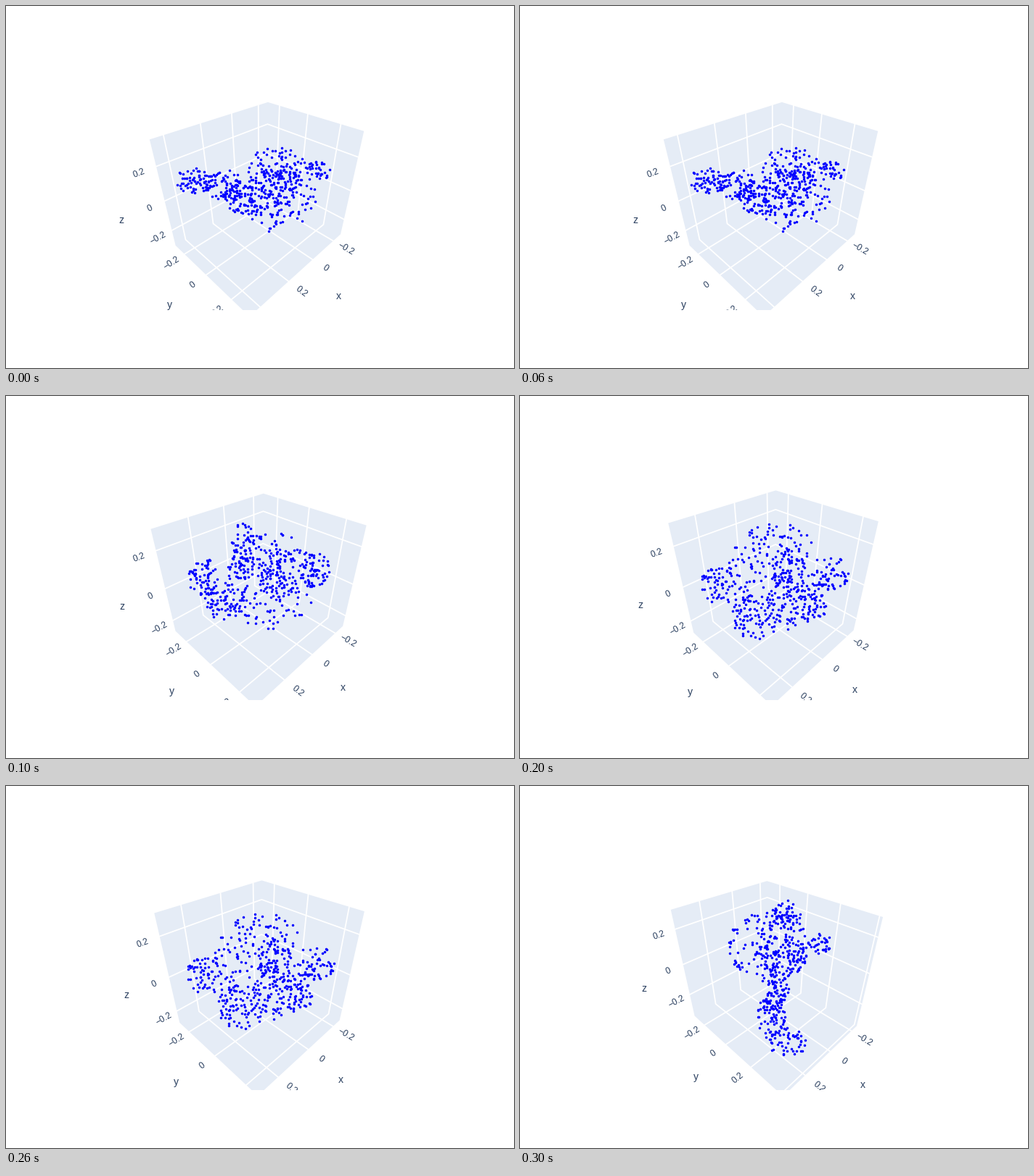
A matplotlib script for the animation above (400 ms loop, 700 by 500 pixels).

```python
import numpy as np
import matplotlib.pyplot as plt
from matplotlib.animation import FuncAnimation
from matplotlib.patches import Polygon

W, H, DPI = 700, 500, 100
LEFT, RIGHT, TOP, BOTTOM = 80, 620, 100, 420
PANE, INK, DOT = "#E5ECF6", "#2a3f5f", "#0000ff"
PX = 72 / DPI
FOCAL = (BOTTOM - TOP) / 2 / np.tan(np.radians(22.5))
EYE = 1.25 * np.sqrt(3)
TICK_GAP, TITLE_GAP = 0.122, 0.328
DOTS = 520

# size: half width and depth of the box; zero: where each axis reads 0;
# step: length of 0.2; blobs: centre x, y and radii in pixels
POSES = [
    dict(size=(0.558, 0.4597), zero=(-0.1405, -0.0227, -0.0135), step=0.2995,
         blobs=[(260, 241, 27, 18), (300, 247, 30, 21), (328, 262, 30, 25),
                (378, 248, 28, 32), (374, 253, 54, 60), (428, 228, 19, 14)]),
    dict(size=(0.536, 0.493), zero=(-0.084, 0.009, -0.02), step=0.33,
         blobs=[(303, 284, 30, 26), (272, 250, 22, 26), (376, 248, 25, 38),
                (365, 255, 62, 68), (326, 215, 18, 40), (425, 240, 22, 24)]),
    dict(size=(0.5065, 0.4855), zero=(-0.05, 0.018, -0.017), step=0.353,
         blobs=[(274, 261, 26, 30), (368, 250, 26, 45), (325, 305, 34, 32),
                (352, 250, 68, 78), (392, 288, 34, 27), (430, 245, 25, 24)]),
    dict(size=(0.458, 0.545), zero=(-0.073, -0.084, 0.05), step=0.303,
         blobs=[(362, 235, 32, 30), (342, 222, 56, 50), (414, 217, 17, 15),
                (366, 178, 20, 22), (355, 288, 17, 22), (346, 318, 20, 34),
                (368, 354, 27, 21)]),
]


def project(p):
    """Perspective view from the (1, 1, 1) direction, in stage pixels."""
    x, y, z = p
    k = FOCAL / (EYE - (x + y + z) / np.sqrt(3))
    return np.array([W / 2 + k * (y - x) / np.sqrt(2),
                     (TOP + BOTTOM) / 2 - k * (2 * z - x - y) / np.sqrt(6)])


def make_cloud(blobs, seed):
    """Share the dots among soft blobs, larger blobs being thinner."""
    rng = np.random.default_rng(seed)
    cx, cy, rx, ry = np.array(blobs, float).T
    share = (rx * ry) ** 0.6
    pick = rng.choice(len(blobs), DOTS, p=share / share.sum())
    r = rng.random(DOTS) ** 0.55
    a = rng.uniform(0, 2 * np.pi, DOTS)
    return cx[pick] + rx[pick] * r * np.cos(a), cy[pick] + ry[pick] * r * np.sin(a)


CLOUDS = [make_cloud(p["blobs"], 11 + i) for i, p in enumerate(POSES)]

fig = plt.figure(figsize=(W / DPI, H / DPI), dpi=DPI, facecolor="white")
ax = fig.add_axes([LEFT / W, 1 - BOTTOM / H, (RIGHT - LEFT) / W, (BOTTOM - TOP) / H])


def label(pos, text, size, angle=0):
    ax.text(pos[0], pos[1] + 1, text, size=size * PX, color=INK,
            family="Liberation Sans", ha="center", va="center",
            rotation=angle, clip_on=True, zorder=3)


def grid_line(*corners):
    xs, ys = zip(*(project(c) for c in corners))
    ax.plot(xs, ys, color="white", lw=1.8 * PX, zorder=2)


def tick_label(base, out, value):
    a = project(base)
    b = project(np.array(base) + TICK_GAP * np.array(out))
    dx, dy = b - a
    text = "0" if value == 0 else f"{value:.1f}".replace("-", "\u2212")
    label(b, text, 12, np.degrees(np.arctan(-dy / dx)))


def draw_box(pose):
    a, b = pose["size"]
    c = 1 / (8 * a * b)  # the box always has volume 1
    outline = [(-a, -b, c), (a, -b, c), (a, -b, -c),
               (a, b, -c), (-a, b, -c), (-a, b, c)]
    ax.add_patch(Polygon([project(p) for p in outline], fc=PANE, ec="none", zorder=1))

    for axis, half in enumerate((a, b, c)):
        for k in range(-2, 3):
            t = pose["zero"][axis] + k * pose["step"]
            if abs(t) > half:
                continue
            if axis == 0:
                path, out = [(t, -b, c), (t, -b, -c), (t, b, -c)], (0, 1, 0)
            elif axis == 1:
                path, out = [(-a, t, c), (-a, t, -c), (a, t, -c)], (1, 0, 0)
            else:
                path, out = [(-a, b, t), (-a, -b, t), (a, -b, t)], (1, 0, 0)
            grid_line(*path)
            tick_label(path[-1], out, k * 0.2)

    label(project((0, b + TITLE_GAP, -c)), "x", 14)
    label(project((a + TITLE_GAP, 0, -c)), "y", 14)
    label(project((a + TITLE_GAP, -b, 0)), "z", 14)


def draw(i):
    ax.clear()
    ax.set_xlim(LEFT, RIGHT)
    ax.set_ylim(BOTTOM, TOP)
    ax.axis("off")
    draw_box(POSES[i])
    ax.scatter(*CLOUDS[i], s=(3.5 * PX) ** 2, c=DOT, linewidths=0, zorder=4)
    return []


anim = FuncAnimation(fig, draw, frames=len(POSES), interval=100,
                     init_func=lambda: draw(0), repeat=True, repeat_delay=0)
plt.show()
```
